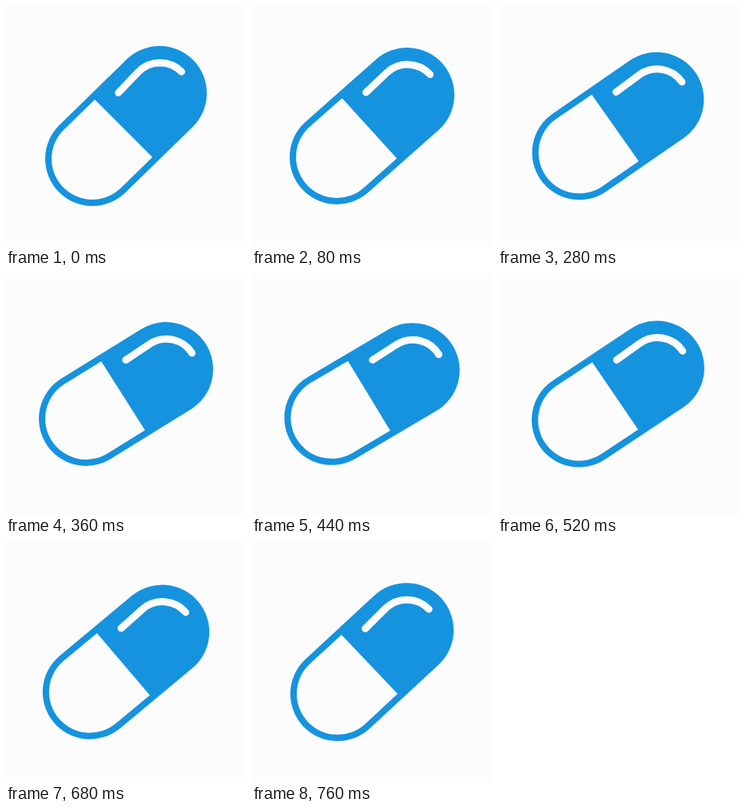
These frames come from a looping animation (300x300 px, 800 ms). An HTML page with a canvas:

```html
<!DOCTYPE html>
<html lang="en">
<head>
<meta charset="utf-8">
<title>Capsule</title>
<style>
  html, body { margin: 0; width: 100%; height: 100%; overflow: hidden; background: #fcfcfc; }
  canvas { display: block; width: 300px; height: 300px; }
</style>
</head>
<body>
<canvas id="stage"></canvas>
<script>
const SIZE = 300, LOOP = 800, STEP = 40;
const PEAK_TIME = 418, PEAK_TILT = 14.6;
const BLUE = '#1593df', PALE = '#fcfcfc';
const RAD = Math.PI / 180;

const canvas = document.getElementById('stage');
const ctx = canvas.getContext('2d');
const ratio = window.devicePixelRatio || 1;
canvas.width = canvas.height = SIZE * ratio;

// Degrees clockwise from the rest pose: steady swing out and back.
function tiltAt(time) {
  return PEAK_TILT * Math.min(time / PEAK_TIME, (LOOP - time) / (LOOP - PEAK_TIME));
}

function drawCapsule() {
  const capX = 42, capY = 41;
  ctx.lineCap = 'round';

  ctx.strokeStyle = BLUE;
  ctx.lineWidth = 118;
  ctx.beginPath();
  ctx.moveTo(-capX, capY);
  ctx.lineTo(capX, -capY);
  ctx.stroke();

  // Hollow half
  ctx.fillStyle = PALE;
  ctx.beginPath();
  ctx.moveTo(33, 39);
  ctx.arc(-capX, capY, 51, 45 * RAD, 225 * RAD);
  ctx.lineTo(-39, -33);
  ctx.fill();

  // Highlight
  ctx.strokeStyle = PALE;
  ctx.lineWidth = 9;
  ctx.beginPath();
  ctx.moveTo(-9.5, -41.5);
  ctx.arc(42.5, -41, 38, 225 * RAD, 315 * RAD);
  ctx.stroke();
}

function render(now) {
  const time = Math.floor((now % LOOP) / STEP) * STEP;
  ctx.setTransform(ratio, 0, 0, ratio, 0, 0);
  ctx.fillStyle = PALE;
  ctx.fillRect(0, 0, SIZE, SIZE);
  ctx.translate(150, 150);
  ctx.rotate(tiltAt(time) * RAD);
  drawCapsule();
}

let start;
function tick(now) {
  start ??= now;
  render(now - start);
  requestAnimationFrame(tick);
}

render(0);
requestAnimationFrame(tick);
</script>
</body>
</html>
```
